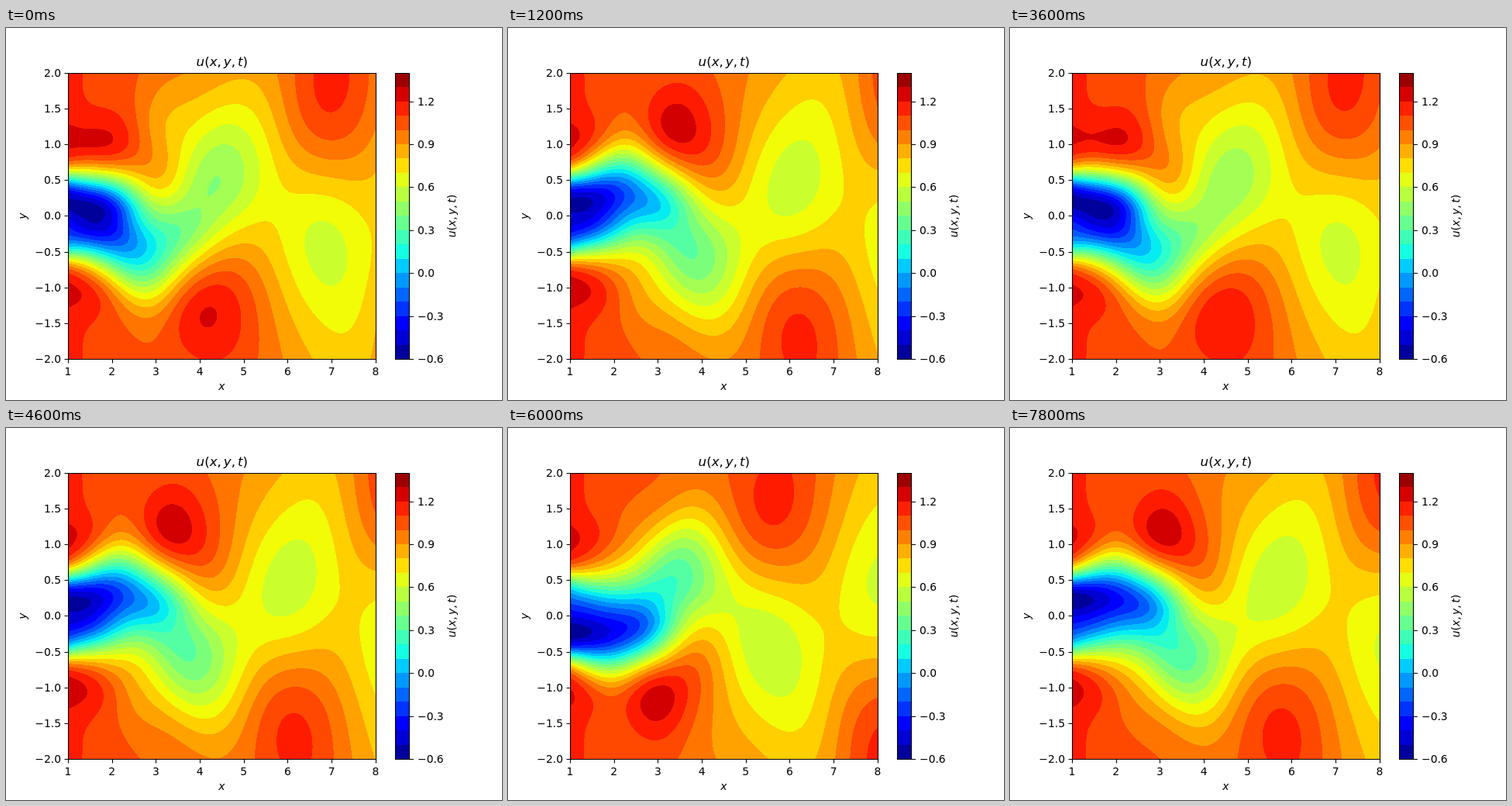
Recreate the animation shown at these times as an HTML page with a canvas. Size 640x480 px, loop 8 s.

```html
<!DOCTYPE html>
<html lang="en">
<head>
<meta charset="utf-8">
<title>u(x, y, t)</title>
<style>
  html, body { margin: 0; width: 100%; height: 100%; overflow: hidden; background: #fff; }
  canvas { position: absolute; left: 81px; top: 59px; }
  svg { position: absolute; left: 0; top: 0; display: block; }
  text { font: 13.89px "DejaVu Sans", sans-serif; fill: #000; }
  .title { font-size: 16.67px; }
  .it { font-style: italic; }
  .line { fill: none; stroke: #000; stroke-width: 1.1; }
</style>
</head>
<body>
<canvas id="field" width="396" height="368"></canvas>
<svg id="plot" width="640" height="480" viewBox="0 0 640 480"></svg>
<script>
const STEP = 200, STEPS = 40, PERIOD = 17.2;
const W = 396, H = 368, TOP_BAND = 15;
const rad = Math.PI / 180;
const clamp = v => Math.max(0, Math.min(1, v));
const bell = (v, center, width) => Math.exp(-(((v - center) / width) ** 2));

// Steady wake: a deficit behind the body that widens and recovers downstream.
function steadyFlow(x) {
  const d = x - 1;
  const outer = 1.03 + .2 * Math.exp(-d / 2);
  const depth = .24 + 1.4 / (1 + (d / 1.85) ** 3.2);
  const width = .6 + .65 * (1 - bell(x, 1, 3));
  const power = 2.1 + 1.7 * Math.exp(-2 * d);
  const rim = .1 * bell(x, 1, 1);
  return r => outer - depth * Math.exp(-((r / width) ** power)) + rim * bell(r, 1.1, .3);
}

// Vortex street: a wave that is odd in y and travels downstream.
function street(x) {
  const size = .21 + .19 * bell(x, 2.9, 2);
  const reach = .33 + .19 * (x - 1);
  const tilt = 90 * bell(x, 2.6, 1.8);
  return (y, r) => {
    const q = y / reach;
    return [size * q * Math.exp((1 - q * q) / 2), (75 * x - 170 + tilt * (r - .9)) * rad];
  };
}

// Pulsing of the wake at twice the shedding rate, even in y.
function pulse(x) {
  const size = .05 + .15 * bell(x, 2.7, 1.3);
  const zero = .4 + .114 * (x - 1);
  const lag = (138 * x - 398) * rad;
  return r => {
    const q = (r / zero) ** 2;
    return [size * (1 - q) * Math.exp(-q / 2.25), lag];
  };
}

const [base, c1, s1, c2, s2] = Array.from({ length: 5 }, () => new Float32Array(W * H));
for (let i = 0; i < W; i++) {
  const x = 1 + (i + 1.5) / 56.686;
  const steady = steadyFlow(x), odd = street(x), even = pulse(x);
  for (let j = 0; j < H; j++) {
    const y = (182.9 - j) / 92.4, r = Math.abs(y), p = j * W + i;
    const [a, la] = odd(y, r), [b, lb] = even(r);
    base[p] = steady(r);
    c1[p] = a * Math.cos(la);
    s1[p] = a * Math.sin(la);
    c2[p] = b * Math.cos(lb);
    s2[p] = b * Math.sin(lb);
  }
}

function jet(v) {
  const r = Math.min((v - .35) / .31, 1 - (v - .89) * .5 / .11);
  const g = Math.min((v - .125) / .25, (.91 - v) / .27);
  const b = Math.min(.5 + v * .5 / .11, (.65 - v) / .31);
  return [r, g, b].map(c => Math.round(255 * clamp(c)));
}
const bands = n => Array.from({ length: n }, (_, i) => jet((i + .5) / n));

const ctx = document.getElementById("field").getContext("2d");
const image = ctx.createImageData(W, H);
const pixels = new Uint32Array(image.data.buffer);
const u = new Float32Array(W * H);

function drawField(n) {
  const psi = 2 * Math.PI * n / PERIOD;
  const ca = Math.cos(psi), sa = Math.sin(psi), cb = Math.cos(2 * psi), sb = Math.sin(2 * psi);
  let min = Infinity;
  for (let p = 0; p < u.length; p++) {
    u[p] = 10 * (base[p] + c1[p] * ca + s1[p] * sa + c2[p] * cb + s2[p] * sb);
    if (u[p] < min) min = u[p];
  }
  // Bands are a tenth wide and start at the lowest value of the step.
  const low = Math.max(-6, Math.floor(min));
  const colors = bands(TOP_BAND - low).map(([r, g, b]) => (255 << 24 | b << 16 | g << 8 | r) >>> 0);
  const last = colors.length - 1;
  for (let p = 0; p < u.length; p++) {
    const k = Math.floor(u[p] - low);
    pixels[p] = colors[k < 0 ? 0 : k > last ? last : k];
  }
  ctx.putImageData(image, 0, 0);
}

function drawAxes() {
  const snap = v => Math.round(v) + .5;
  const label = (x, y, s, anchor, extra = "") =>
    `<text x="${x}" y="${y}" text-anchor="${anchor}" ${extra}>${s}</text>`;
  const num = v => v.toFixed(1).replace("-", "\u2212");
  const it = (s, gap = 0) => `<tspan class="it" dx="${gap}em">${s}</tspan>`;
  const formula = `${it("u")}(${it("x")},${it("y", .18)},${it("t", .18)})`;
  const turned = (x, s) => label(0, 0, s, "middle", `transform="translate(${x} 242.6) rotate(-90)"`);
  let out = "", ticks = "";

  bands(20).forEach((c, i) => {
    const top = Math.round(427.2 - (i + 1) * 18.48), bottom = Math.round(427.2 - i * 18.48);
    out += `<rect x="502" y="${top}" width="19" height="${bottom - top}" fill="rgb(${c})"/>`;
  });
  for (let i = 1; i <= 8; i++) {
    const x = 80 + (i - 1) * 56.686;
    ticks += `M${snap(x)} 427.5v5`;
    out += label(x, 448, i, "middle");
  }
  for (let i = -4; i <= 4; i++) {
    const y = 242.4 - i * 46.2;
    ticks += `M80.5 ${snap(y)}h-5`;
    out += label(71, Math.round(y + 5), num(i / 2), "end");
  }
  for (let i = -2; i <= 4; i++) {
    const y = 427.2 - (i + 2) * 55.44;
    ticks += `M521 ${snap(y)}h5`;
    out += label(531, Math.round(y + 5), num(i * .3), "start");
  }
  out += `<path class="line" d="M80.5 58.5H477.5V427.5H80.5ZM502.5 58.5H520.5V427.5H502.5Z${ticks}"/>`;
  out += label(278.8, 49, formula, "middle", 'class="title"');
  out += label(278.4, 467, it("x"), "middle") + turned(26, it("y")) + turned(580, formula);
  document.getElementById("plot").innerHTML = out;
}

let shown = -1;
const start = performance.now();
function tick() {
  const n = Math.floor((performance.now() - start) / STEP) % STEPS;
  if (n !== shown) drawField(shown = n);
  requestAnimationFrame(tick);
}
drawAxes();
tick();
</script>
</body>
</html>
```
